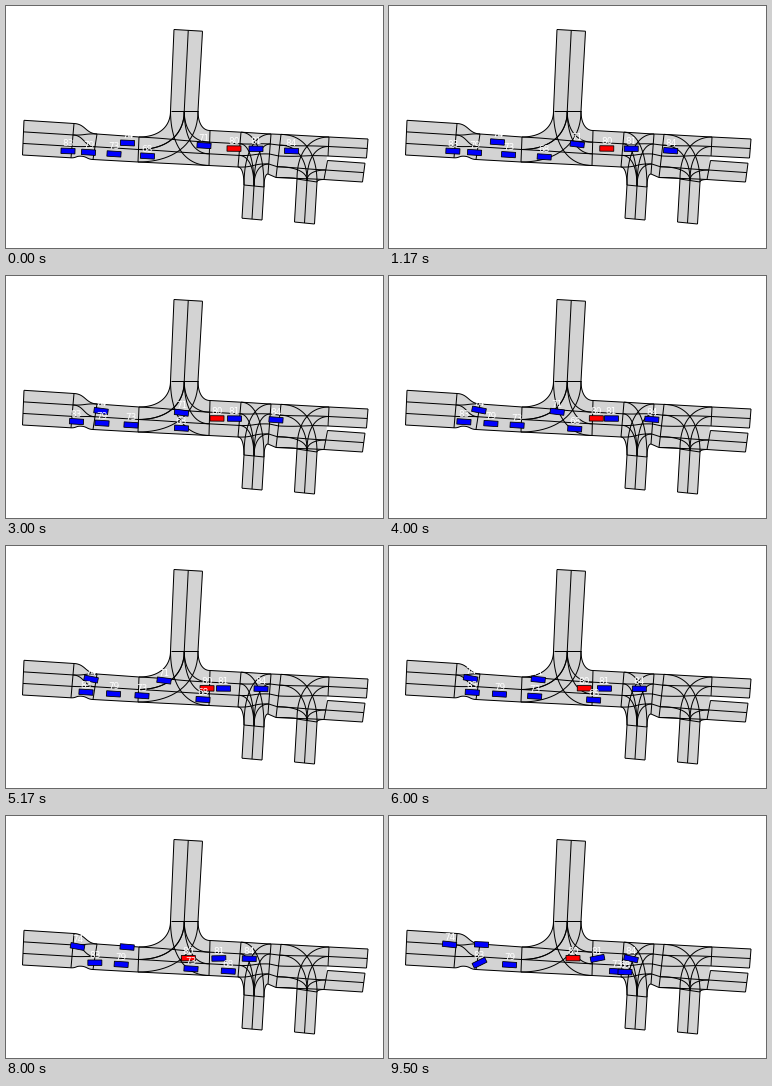
These frames come from a looping animation (377x242 px, 9.67 s). A matplotlib script:

```python
import numpy as np
import matplotlib.pyplot as plt
from matplotlib.animation import FuncAnimation
from matplotlib.collections import LineCollection, PolyCollection
from matplotlib.patches import Polygon

W, H, DPI = 377, 242, 100
LOOP, STEPS = 9670, 58
SUB = 8                       # drawn frames per simulation step
PX = 72 / DPI
SLOPE = 0.05                  # the main road falls gently to the east
KEYS = (0, 3, 5.17, 7, 9.5)   # times of the car positions, in seconds

fig = plt.figure(figsize=(W / DPI, H / DPI), dpi=DPI, facecolor="white")
ax = fig.add_axes([0, 0, 1, 1])
ax.set_xlim(0, W)
ax.set_ylim(H, 0)
ax.axis("off")

fills, lines = [], []


def gate(a, b, lanes):
    """Lane border points across a road, from a to b."""
    return np.linspace(a, b, lanes + 1)


def bezier(a, p, q, b):
    u = np.linspace(0, 1, 24)[:, None]
    a, p, q, b = map(np.array, (a, p, q, b))
    return a * (1 - u) ** 3 + 3 * p * u * (1 - u) ** 2 + 3 * q * u * u * (1 - u) + b * u ** 3


def link(a, b):
    """Border along the main road, level with it at both ends."""
    half = (b[0] - a[0]) / 2
    return bezier(a, (a[0] + half, a[1] + SLOPE * half),
                  (b[0] - half, b[1] - SLOPE * half), b)


def turn(a, b, pull=0.62):
    """Border that leaves a side arm at a and joins the main road at b."""
    a, b = np.array(a), np.array(b)
    corner = np.array((a[0], b[1]))
    return bezier(a, a + pull * (corner - a), b + pull * (corner - b), b)


def strip(a, b):
    """Straight road between two gates."""
    fills.append(np.array([a[0], b[0], b[-1], a[-1]]))
    lines.extend([a, b])
    lines.extend(np.array(pair) for pair in zip(a, b))


def junction(arm, west, east):
    """Side arm on a main road; gates start with the border nearest the arm."""
    left, mid, right = arm
    for edge, own, other in ((left, west, east), (right, east, west)):
        for end, inner in ((own[0], own[1]), (other[-1], other[-2])):
            lines.extend([turn(edge, end), turn(mid, inner)])
    fills.append(np.vstack([turn(left, west[0]), west[-1:], east[-1:],
                            turn(right, east[0])[::-1]]))


def through(a, b):
    lines.extend(link(p, q) for p, q in zip(a, b))


def build_roads():
    w0 = gate((18, 114.3), (16.5, 149), 3)
    w1 = gate((68, 117.5), (65, 151.8), 3)
    w2 = gate((91, 128), (87, 153.5), 2)
    j0 = gate((133, 131), (132, 156), 2)
    j1 = gate((204, 124.5), (203, 159.5), 3)
    k0 = gate((235, 126.2), (232, 161), 3)
    k1 = gate((265, 128), (262, 168), 4)
    k2 = gate((275, 128.4), (270, 171.5), 4)
    upper = gate((323, 131), (322, 150), 2)
    lower = gate((321.5, 154.5), (318, 173.5), 2)
    north = gate((164.5, 105), (192, 105), 2)
    south1 = gate((238, 179), (258, 181), 2)
    south2 = gate((291, 173), (311, 176), 2)

    for a, b in ((w0, w1), (w2, j0), (j1, k0), (k1, k2),
                 (upper, gate((362, 133), (360.5, 152), 2)),
                 (lower, gate((359, 157.2), (356.5, 176), 2)),
                 (north, gate((168, 23.5), (196.5, 25.2), 2)),
                 (south1, gate((236, 212.2), (256, 214), 2)),
                 (south2, gate((288.5, 216), (308.5, 218), 2))):
        strip(a, b)

    # three lanes merge into two, with a small kink on the lower kerb
    kink = (75, 150.2)
    kerb = np.vstack([link(w1[-1], kink), link(kink, w2[-1])])
    top = link(w1[0], w2[0])
    fills.append(np.vstack([top, kerb[::-1]]))
    lines.extend([top, kerb])
    through(w1[[1, 1, 2]], w2[[0, 1, 1]])

    east = np.vstack([upper, lower[1:]])
    through(j0, j1[1:])
    through(k0, k1)
    through(k2, east)
    junction(north, j0, j1)
    junction(south1, k0[::-1], k1[::-1])
    junction(south2, k2[::-1], east[::-1])

    ax.add_collection(PolyCollection(fills, fc="#d3d3d3", ec="#d3d3d3", lw=0.3))
    ax.add_collection(LineCollection(lines, colors="black", lw=PX))


# centre lines the cars follow, as (x, y) points
LOW = ((62, 145), (236, 156))
MID = ((184, 142.2), (255, 142.8), (286, 145))
HIGH = ((92, 128.5), (150, 133.5), (198, 139.5))
MERGE = ((60, 128.3), (95, 135), (122, 137))


class Car:
    def __init__(self, name, lane, xs, steer=0, color="blue"):
        self.motion = np.polyfit(KEYS, xs, len(KEYS) - 1)
        self.lane = np.array(lane).T
        self.steer = np.radians(steer)
        self.body = ax.add_patch(Polygon(np.zeros((4, 2)), fc=color, ec="black",
                                         lw=0.8 * PX, zorder=3))
        self.label = ax.text(0, 0, name, color="white", fontsize=6.4, ha="center",
                             va="center_baseline", family="DejaVu Sans", zorder=4)

    def height(self, x):
        return np.interp(x, *self.lane)

    def place(self, t):
        x = np.polyval(self.motion, t)
        y = self.height(x)
        a = np.arctan((self.height(x + 4) - self.height(x - 4)) / 8)
        a += self.steer * np.clip((t - 7.8) / 1.7, 0, 1)
        box = np.array([(-7, -2.7), (7, -2.7), (7, 2.7), (-7, 2.7)])
        rot = np.array([(np.cos(a), np.sin(a)), (-np.sin(a), np.cos(a))])
        self.body.set_xy(box @ rot + (x, y))
        self.label.set_position((x, y - 8))


build_roads()
cars = [
    Car("83", LOW, (62, 70.5, 80, 86.5, 90.5), steer=-30),
    Car("79", LOW, (82.5, 96, 107.5, 113, 120.5)),
    Car("73", LOW, (108, 125, 136, 162.5, 227.5)),
    Car("74", MERGE, (121.5, 95, 85, 77, 60.5)),
    Car("68", LOW, (141.5, 175.5, 197, 213.5, 236)),
    Car("71", HIGH, (198, 175.5, 158, 136.5, 92.5)),
    Car("80", MID, (228, 211, 201, 188, 184), color="red"),
    Car("81", MID, (250, 228.5, 217.5, 214, 208.5), steer=-12),
    Car("84", MID, (285.5, 270, 255, 246, 242), steer=12),
]


def update(i):
    # the +1 makes up for steps being a hair shorter than LOOP / STEPS
    t = min((i + 1) // SUB, STEPS - 1) / 6
    for car in cars:
        car.place(t)
    return [p for car in cars for p in (car.body, car.label)]


frames = STEPS * SUB
anim = FuncAnimation(fig, update, frames=frames, interval=LOOP / frames,
                     init_func=lambda: update(0), repeat=True, repeat_delay=0)
plt.show()
```
